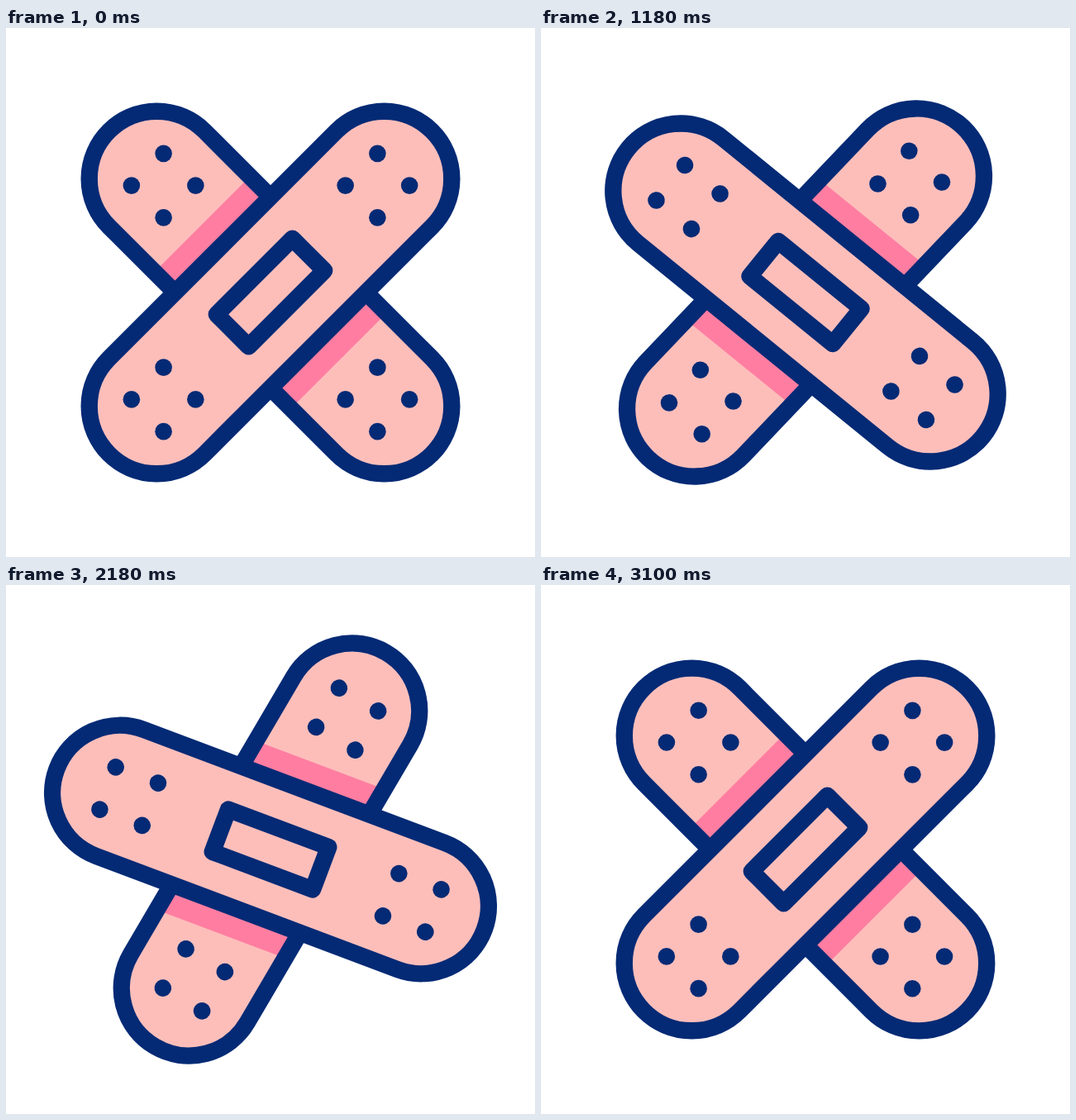
Recreate the animation shown at these times as an HTML page. Size 640 by 640 pixels, loop 3.6 s.

```html
<!DOCTYPE html>
<html lang="en">
<head>
<meta charset="utf-8">
<title>Crossed plasters</title>
<style>
  @property --turn { syntax: '<angle>'; inherits: false; initial-value: 0deg; }
  html, body { margin: 0; width: 100%; height: 100%; overflow: hidden; background: #fff; }
  svg { display: block; width: 100%; height: 100%; }
  .front, .back, .unback { transform: rotate(var(--turn)); }
  .skin { fill: #fdbeba; }
  .shade { fill: #ff7da1; }
  .line { fill: none; stroke: #042a75; stroke-width: 20.4; stroke-linejoin: round; }
  .dots { fill: #042a75; }
</style>
</head>
<body>
<svg viewBox="0 0 640 640">
  <defs>
    <rect id="strip" x="-276.3" y="-81.7" width="552.6" height="163.4" rx="81.7"/>
    <clipPath id="inside"><use href="#strip"/></clipPath>
    <g id="four">
      <circle cx="-27.4" cy="-27.4" r="10.3"/>
      <circle cx="27.4" cy="-27.4" r="10.3"/>
      <circle cx="-27.4" cy="27.4" r="10.3"/>
      <circle cx="27.4" cy="27.4" r="10.3"/>
    </g>
    <g id="dots" class="dots">
      <use href="#four" x="-183"/>
      <use href="#four" x="183"/>
    </g>
  </defs>
  <g transform="translate(320 320)">
    <g class="back">
      <use href="#strip" class="skin"/>
      <g clip-path="url(#inside)">
        <!-- undo the back turn so the shadow follows the front strip -->
        <g class="unback">
          <g class="front">
            <rect class="shade" x="-400" y="-116.8" width="800" height="233.6"/>
          </g>
        </g>
      </g>
      <use href="#strip" class="line"/>
      <use href="#dots"/>
    </g>
    <g class="front">
      <use href="#strip" class="skin"/>
      <use href="#strip" class="line"/>
      <rect class="line" x="-64.8" y="-27.4" width="129.6" height="54.8"/>
      <use href="#dots"/>
    </g>
  </g>
</svg>
<script>
  const LOOP = 3600;
  const soft = 'cubic-bezier(.333,0,.667,1)';
  const swing = 'cubic-bezier(.79,0,.51,1)';
  const glide = 'cubic-bezier(.755,0,.19,1)';

  // [time in ms, angle in degrees, easing towards the next step]
  const front = [
    [0, -45], [305, -45, soft], [469, -36.7, swing], [1224, -141.4, soft],
    [1360, -135], [1552, -135, glide], [3052, -225], [LOOP, -225]
  ];
  const back = [
    [0, -135], [320, -135, soft], [497, -139.6, swing], [1252, -45],
    [1630, -45, glide], [3140, -135], [LOOP, -135]
  ];

  // A custom property keeps the shapes redrawn sharply at every angle.
  function turn(selector, steps, sign = 1) {
    const keyframes = steps.map(([time, angle, easing = 'linear']) => ({
      offset: time / LOOP,
      '--turn': `${sign * angle}deg`,
      easing
    }));
    for (const el of document.querySelectorAll(selector)) {
      el.animate(keyframes, { duration: LOOP, iterations: Infinity }).startTime =
        document.timeline.currentTime;
    }
  }

  turn('.front', front);
  turn('.back', back);
  turn('.unback', back, -1);
</script>
</body>
</html>
```
